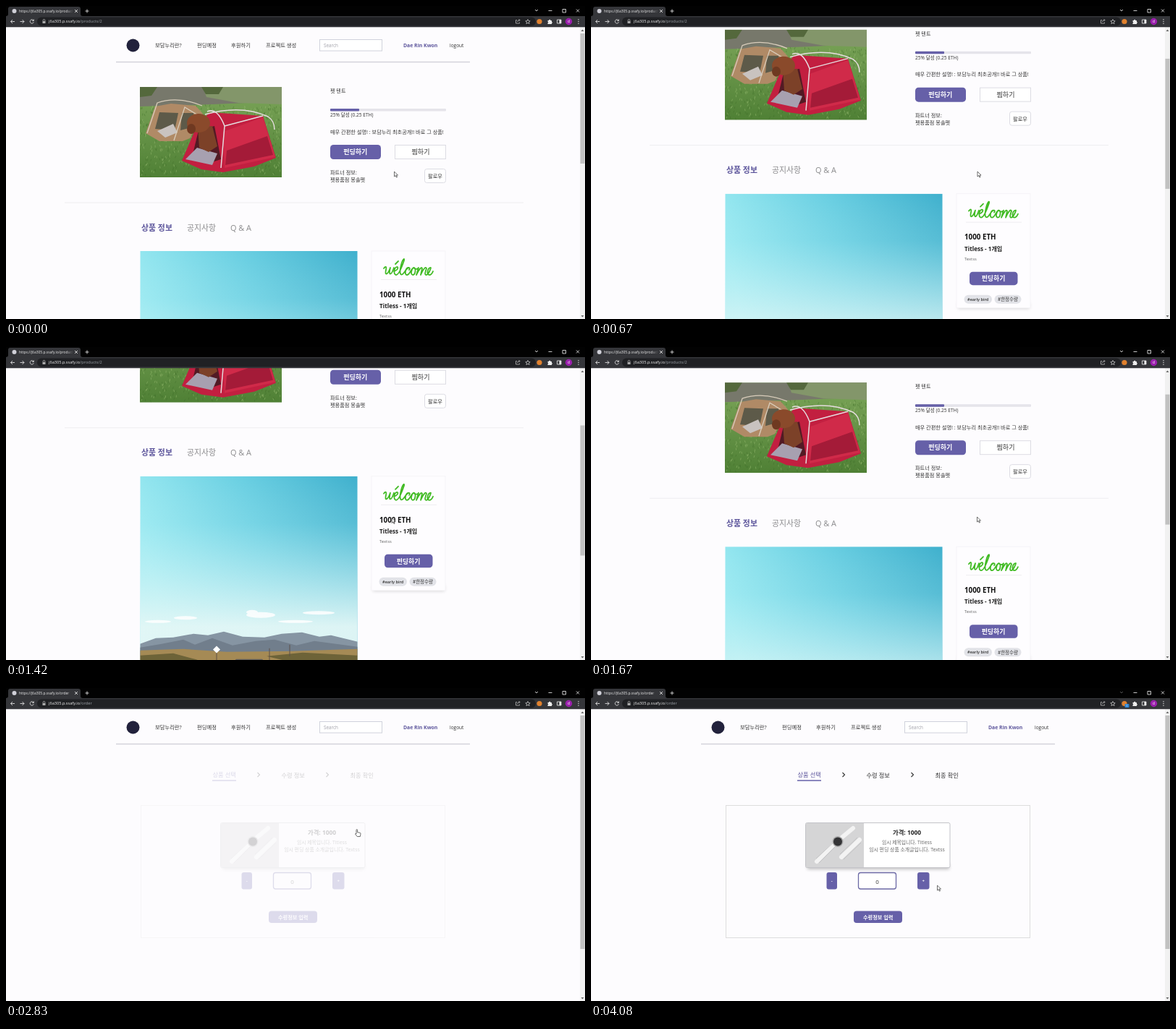
An HTML page for the animation above (4160 ms loop, 800 by 433 pixels).

```html
<!DOCTYPE html>
<html lang="ko">
<head>
<meta charset="utf-8">
<title>Pet tent funding</title>
<style>
html, body { margin: 0; width: 100%; height: 100%; overflow: hidden; background: #fdfcfe; }
svg { display: block; width: 100%; height: 100%; }
text { font: 7.2px 'Open Sans', 'Noto Sans CJK KR', 'Noto Sans CJK', sans-serif; fill: #333; dominant-baseline: central; }
.mid { text-anchor: middle; }
.bold { font-weight: 700; }
.nav { font-size: 7.3px; }
.step { font-size: 8.2px; }
.tab { font-size: 10.9px; fill: #8b8b8d; }
.accent { fill: #5d569c; }
.fill { fill: #6660a8; }
.white { fill: #fff; }
.grey { fill: #666; }
.box { fill: #fff; stroke: #dcdce3; }
.line { fill: none; stroke: #ddd; stroke-width: 1; }
</style>
</head>
<body>
<svg viewBox="0 0 800 433" preserveAspectRatio="none">
  <defs>
    <linearGradient id="sky" x1="0" y1=".25" x2="1" y2="0">
      <stop stop-color="#98e9f1"/><stop offset=".5" stop-color="#69cfe2"/><stop offset="1" stop-color="#3fb0cd"/>
    </linearGradient>
    <linearGradient id="haze" x1="0" y1="0" x2="0" y2="1">
      <stop stop-color="#e4f7f6" stop-opacity="0"/><stop offset=".25" stop-color="#c5f3f6" stop-opacity=".15"/>
      <stop offset=".8" stop-color="#e4f7f6" stop-opacity=".95"/>
    </linearGradient>
    <linearGradient id="grass" x1="0" y1="0" x2="0" y2="1">
      <stop stop-color="#7da65a"/><stop offset="1" stop-color="#4f8035"/>
    </linearGradient>
    <linearGradient id="fade"><stop stop-color="#35363a" stop-opacity="0"/><stop offset="1" stop-color="#35363a"/></linearGradient>
    <filter id="soft" x="-10%" y="-50%" width="120%" height="200%"><feGaussianBlur stdDeviation="2"/></filter>
    <clipPath id="photoClip"><path d="M185 112h196v125H185z"/></clipPath>
    <clipPath id="skyClip"><path d="M185.5 339h300v300h-300z"/></clipPath>
  </defs>

  <rect width="800" height="433" fill="#fdfcfe"/>

  <g id="page">
    <g id="navbar">
      <circle cx="175.5" cy="54.5" r="9" fill="#22223c"/>
      <text class="nav" x="206" y="54">보담누리란?</text>
      <text class="nav" x="264" y="54">펀딩예정</text>
      <text class="nav" x="311" y="54">후원하기</text>
      <text class="nav" x="359" y="54">프로젝트 생성</text>
      <rect class="box" x="433.5" y="46.5" width="86" height="15.5" style="stroke:#d0d2dc"/>
      <text x="439" y="54.3" style="font-size:6.3px;fill:#a0a0a8">Search</text>
      <text class="accent bold" x="549" y="54" style="font-size:6.9px">Dae Rin Kwon</text>
      <text x="613" y="54" style="font-size:6.5px">logout</text>
      <path class="line" d="M152 77.5H641" style="stroke:#d3d3da;stroke-width:1.5"/>
    </g>

    <g id="product">
      <g clip-path="url(#photoClip)">
        <rect x="185" y="112" width="196" height="125" fill="url(#grass)"/>
        <path d="M185 112h196v20l-96 4-100 3z" fill="#77786b"/>
        <path d="M272 112h109v24l-60-2-44-8z" fill="#83966a"/>
        <path d="M185 112h24l-8 12-16 2zM270 112h30l-6 10-18 0z" fill="#54683c"/>
        <path id="blades" fill="none" stroke-width=".7" stroke="#3c6a28" opacity=".6"/>
        <path id="lightBlades" fill="none" stroke-width=".7" stroke="#a3c57c" opacity=".6"/>
        <path d="M193 176l13-37 22-4 34 3 10 11-18 34-10 4-32 0z" fill="#b08a66"/>
        <path d="M206 170l6-23 26 1-5 24zM243 148l16 0 4 18-22 6z" fill="#5d5a49"/>
        <path d="M209 173l22-10 6 12-17 7z" fill="#c9c3c0"/>
        <path d="M195 176l14-42q28-10 62 4M232 186l15-46 20 12" fill="none" stroke="#d9cdbb" stroke-width="1.3"/>
        <path d="M243 214l18-42 20-25 74 5 18 58-30 12-43 8-30-4z" fill="#c21f40"/>
        <path d="M300 174l55-20 17 55-70 15z" fill="#d02a49"/>
        <path d="M305 200l56-20 8 26-66 14z" fill="#a41b38"/>
        <path d="M258 205l8-33 22-6 9 46-18 6z" fill="#521a24"/>
        <path d="M248 212l16-16 28 8-7 16z" fill="#a7a0b0"/>
        <path d="M265 168l20-2 7 28-12 8-13-6z" fill="#7c4128"/>
        <ellipse cx="266" cy="162" rx="16" ry="13" fill="#8a4a2b"/>
        <ellipse cx="256" cy="170" rx="6" ry="7" fill="#6f3921"/>
        <path d="M278 146q14-6 24 20l-5 58M275 150q50-14 87 3 9 6 9 18M302 166l53-14" fill="none" stroke="#e5dcde" stroke-width="1.5"/>
      </g>

      <text x="448" y="117" style="font-size:7.1px">펫 텐트</text>
      <rect x="448" y="142" width="160" height="3.5" rx="1" fill="#e5e4ea"/>
      <rect class="fill" x="448" y="142" width="40" height="3.5" rx="1"/>
      <text x="448" y="150.5" style="font-size:6.6px">25% 달성 (0.25 ETH)</text>
      <text x="448" y="173.5">매우 간편한 설명! : 보담누리 최초공개!! 바로 그 상품!</text>
      <g id="fund">
        <rect class="fill" x="448" y="192" width="70" height="20" rx="4.5"/>
        <text class="mid bold white" x="482.7" y="201.7" style="font-size:9px">펀딩하기</text>
      </g>
      <rect class="box" x="537.5" y="192.5" width="70" height="19"/>
      <text class="mid" x="573" y="201.7" style="font-size:9px;font-weight:500">찜하기</text>
      <text x="448" y="230">파트너 정보:</text>
      <text x="448" y="240">펫용품점 몽솔펫</text>
      <rect class="box" x="578.5" y="225.5" width="29" height="19" rx="3"/>
      <text class="mid" x="593" y="235">팔로우</text>
      <path class="line" d="M81 272H715" style="stroke:#eeedf0"/>

      <text class="tab accent bold" x="187" y="306">상품 정보</text>
      <text class="tab" x="250" y="306">공지사항</text>
      <text class="tab" x="310" y="306">Q &amp; A</text>

      <g clip-path="url(#skyClip)">
        <rect x="185" y="339" width="301" height="300" fill="url(#sky)"/>
        <rect x="185" y="339" width="301" height="260" fill="url(#haze)"/>
        <g fill="#fff" opacity=".85">
          <ellipse cx="352" cy="531" rx="20" ry="4"/><ellipse cx="340" cy="527" rx="8" ry="3"/>
          <ellipse cx="248" cy="535" rx="16" ry="2.5"/><ellipse cx="432" cy="528" rx="22" ry="2.5"/>
          <ellipse cx="210" cy="540" rx="18" ry="2"/><ellipse cx="400" cy="540" rx="24" ry="2"/>
        </g>
        <path d="M185 571l22-8 24-1 28-5 20 2 22-5 26 7 30 1 24-5 28-2 24 6 16-2 37 9v20H185z" fill="#8695a3"/>
        <path d="M185 576l30-5 30-6 16 7 24-9 28 10 32-6 26-2 30 8 25-6 60 8v12H185z" fill="#717e8c"/>
        <path d="M185 580l60-2 60 4 90-1 91-3v61H185z" fill="#a58a55"/>
        <path d="M185 587l46-3 34 9-80 6zM360 588l50-5 76 4v10l-80 2z" fill="#6d6338"/>
        <path d="M318 592h36l50 47H262z" fill="#5e5d5c"/>
        <path d="M291 579v16M364 577v18M392 572v16" stroke="#5c5148"/>
        <path d="M291 573.7l5 5-5 5-5-5z" fill="#fff"/>
      </g>

      <rect x="507" y="490" width="99" height="8" fill="#aaa" opacity=".5" filter="url(#soft)"/>
      <rect x="505" y="339" width="102" height="158" fill="#fefdff" stroke="#f5f4f7"/>
      <path fill="none" stroke="#42bb25" stroke-width="1.8" stroke-linecap="round" stroke-linejoin="round" d="M522 363C525 359 526 361 525 365C523 373 527 373 531 362C528 373 532 374 536 362M536 367C541 366 543 361 540 361C536 362 535 372 539 372C543 372 548 358 550 352C551 348 548 350 546 358C543 370 545 373 548 371C551 369 553 362 557 362C559 363 557 365 557 365M556 362C552 362 550 372 554 372C558 372 559 364 563 362C567 361 566 372 562 372C558 371 561 363 563 362C566 365 569 364 570 362L567 372C571 364 574 360 575 363L573 372C577 363 580 360 581 363C579 369 578 372 581 372C584 371 587 363 587 362C583 361 580 372 585 372C588 372 589 369 590 367M538 357L542 353"/>
      <path class="line" d="M518 378.5H595" style="stroke:#eeedf0"/>
      <text class="bold" x="516" y="399.3" style="font-size:9.8px;fill:#111">1000 ETH</text>
      <text class="bold" x="516" y="414.7" style="font-size:8.1px;fill:#222">Titless - 1개입</text>
      <text class="grey" x="516" y="429" style="font-size:5.9px">Textss</text>
      <rect class="fill" x="523" y="447" width="66.5" height="18.5" rx="4.5"/>
      <text class="mid bold white" x="556" y="456.3" style="font-size:8.9px">펀딩하기</text>
      <g fill="#e2e3e8"><rect x="515.5" y="479" width="38.5" height="12" rx="6"/><rect x="557.5" y="479" width="37" height="12" rx="6"/></g>
      <text class="mid" x="534.7" y="485" style="font-size:5.6px;font-weight:600">#early bird</text>
      <text class="mid" x="576" y="485" style="font-size:6.5px;font-weight:500">#한정수량</text>
    </g>
  </g>

  <g id="order">
    <text class="step accent" x="285.5" y="119.5">상품 선택</text>
    <path class="line" d="M285 128H318" style="stroke:#6660a8;stroke-width:1.3"/>
    <text class="step" x="380.5" y="120">수령 정보</text>
    <text class="step" x="475.5" y="120">최종 확인</text>
    <path class="line" d="M347.5 117l3 3-3 3M442.500 117l3 3-3 3" style="stroke:#333;stroke-width:1.1"/>
    <rect x="186.500" y="162.500" width="420" height="183" class="line"/>
    <rect x="299" y="243" width="196" height="8" fill="#888" opacity=".5" filter="url(#soft)"/>
    <rect x="296.500" y="186.500" width="199.500" height="62" rx="2" class="box" style="stroke:#c3c3c8"/>
    <rect x="297" y="187" width="80" height="61" fill="#d5d5d6"/>
    <g stroke="#f3f3f3" stroke-width="6" stroke-linecap="round"><path d="M312 240L336 216M345 208L362 194M346 234L371 210"/></g>
    <g stroke="#b9b9bb" stroke-width=".7"><path d="M311 236l26-24M315 242l22-22M344 230l24-23M349 237l24-23"/></g>
    <circle cx="341" cy="212.500" r="7.500" fill="#aaa"/><circle cx="341" cy="212.500" r="6" fill="#343436"/>
    <text class="mid bold" x="436.500" y="199" style="font-size:8.4px;fill:#222">가격: 1000</text>
    <text class="mid grey" x="436.500" y="213" style="font-size:6.800px">임시 제목입니다. Titless</text>
    <text class="mid grey" x="436.500" y="223.500" style="font-size:6.900px">임시 펀딩 상품 소개글입니다. Textss</text>
    <g class="fill">
      <rect x="325.500" y="255" width="14.500" height="23.500" rx="3"/>
      <rect x="451" y="255" width="16.500" height="23.500" rx="3"/>
      <rect x="363" y="308.500" width="67" height="16.500" rx="4"/>
    </g>
    <rect class="box" x="369.500" y="255.500" width="52" height="22.500" rx="3" style="stroke:#6c69a5;stroke-width:1.300"/>
    <text class="mid" x="395.500" y="267" style="font-size:8px">0</text>
    <text class="mid white bold" x="332.700" y="266.500" style="font-size:6px">-</text>
    <text class="mid white bold" x="459.200" y="266.500" style="font-size:6px">+</text>
    <text class="mid white bold" x="396.700" y="316.700">수령정보 입력</text>
  </g>

  <rect x="793" y="29" width="7" height="404" fill="#f1f1f1"/>
  <rect id="thumb" x="793.500" width="6" fill="#c1c1c1"/>
  <path d="M794.500 35l2-2.500 2 2.500zM794.500 428l2 2.500 2-2.500z" fill="#666"/>

  <g id="browser">
    <rect width="800" height="14" fill="#020202"/>
    <path d="M0 14q3 0 3-3V4q0-3 3-3h94q3 0 3 3v7q0 3 3 3h694v15.300H0z" fill="#35363a"/>
    <rect x="43" y="15.500" width="689" height="12" rx="6" fill="#202124"/>
    <circle cx="11.500" cy="7" r="3" fill="#d0d0d8"/>
    <text id="title" x="18" y="7" style="font-size:4.950px;fill:#eee"></text>
    <rect x="84" y="2" width="9" height="10" fill="url(#fade)"/>
    <text x="59" y="21.300" style="font-size:5.630px;fill:#f1f1f1">j6a305.p.ssafy.io<tspan id="path" fill="#9aa0a6"></tspan></text>
    <g fill="none" stroke="#ddd" stroke-width=".9">
      <path d="M95 5l4 4m0-4l-4 4M109.500 7h5M112 4.500v5M749.500 6.500h5M769 4.500h4.500v4.500H769zM788 4.500l4 4m0-4l-4 4"/>
      <path id="chevron" d="M731 5l2 2 2-2"/>
      <path d="M12 21.500H6.500m2.500-2.500l-2.500 2.500 2.500 2.500M19.500 21.500H25m-2.500-2.500l2.500 2.500-2.500 2.500M38 20a2.600 2.600 0 1 0 .3 2.200M38.300 18.500v2h-2"/>
      <path d="M51.200 21v-1.300a1.300 1.300 0 0 1 2.600 0V21M706 19.500h-1.500v4.500h5v-1.500M706.500 22q0-2.500 3.500-2.500m-1.500-1.500l1.500 1.500-1.500 1.500" stroke="#aaa"/>
      <path d="M721 18.500l1 2.200 2.200.1-1.700 1.500.6 2.200-2.100-1.200-2.100 1.200.6-2.200-1.700-1.500 2.200-.1z" stroke-width=".7"/>
      <path d="M761.500 19h5.500v5h-5.500z"/>
    </g>
    <path d="M50.500 21h4v3h-4z" fill="#aaa"/>
    <path d="M748.500 20h1.500a1.200 1.200 0 0 1 2.400 0h1.600v1.700a1.200 1.200 0 0 1 0 2.300v1h-5.500v-1.600a1.200 1.200 0 0 0 0-2z M764.500 19h2.500v5h-2.500z" fill="#eee"/>
    <circle cx="737" cy="21.500" r="3.600" fill="#e2822e"/>
    <g id="badge"><rect x="737.500" y="22" width="6" height="5" rx="1" fill="#2f86d6"/><text class="mid white" x="740.500" y="24.500" style="font-size:4px">1</text></g>
    <circle cx="777.500" cy="21.500" r="4.700" fill="#9b1fad"/>
    <text class="mid white" x="777.500" y="21.300" style="font-size:5px">d</text>
    <g fill="#ddd"><circle cx="791" cy="18.800" r=".7"/><circle cx="791" cy="21.500" r=".7"/><circle cx="791" cy="24.200" r=".7"/></g>
  </g>

  <g id="pointer" stroke-width=".7" stroke-linejoin="round" fill="#fff" stroke="#333">
    <path id="arrow" d="M0 0v7l1.700-1.500 1.200 2.600 1.100-.5-1.200-2.500H5z"/>
    <path id="hand" d="M-1 4.500V.6q0-1 .8-1t.8 1v3l3.600.7q1 .3.800 1.500l-.7 3.700h-4L-2.500 6q.2-1.300 1.500-.2z"/>
  </g>
</svg>
<script>
const LOOP = 4160, STEP = 1000 / 12;
const CLICK = 2580, HAND_ON = 1990, HAND_OFF = 3080, BLUR = 3400;
const SCROLL = [[250, 0], [670, 80], [1000, 166.7], [1400, 166.7], [1670, 61.5], [1920, 0]];
const FADE = [[2650, 0], [2830, .2], [3650, 1]];
const MOUSE_X = [[0, 536.5], [670, 534], [1000, 532.5], [1670, 533.5], [1800, 533], [2060, 486.5], [2830, 485], [3080, 485], [3900, 478.5]];
const MOUSE_Y = [[0, 229], [670, 229], [1000, 239], [1670, 235], [1800, 234], [2060, 198], [2830, 196], [3080, 196], [3900, 273]];

const $ = id => document.getElementById(id);
const show = (id, on) => $(id).style.display = on ? '' : 'none';

// Linear interpolation through [time, value] pairs, held at both ends.
function at(keys, t) {
  const next = keys.findIndex(k => k[0] > t);
  if (next < 0) return keys[keys.length - 1][1];
  if (next === 0) return keys[0][1];
  const [t0, a] = keys[next - 1], [t1, b] = keys[next];
  return a + (b - a) * (t - t0) / (t1 - t0);
}

let seed = 7;
const random = () => (seed = seed * 16807 % 2147483647) / 2147483647;
function grass(count) {
  let d = '';
  while (count--) d += `M${185 + random() * 196} ${139 + random() * 98}l${random() * 3 - 1.5} -3`;
  return d;
}
$('blades').setAttribute('d', grass(420));
$('lightBlades').setAttribute('d', grass(320));

function draw(now) {
  const t = Math.floor((now % LOOP + 4) / STEP) * STEP;
  const ordering = t >= CLICK;
  const scroll = at(SCROLL, t);
  const hand = t >= HAND_ON && t < HAND_OFF;
  const path = ordering ? '/order' : '/products/2';

  $('page').setAttribute('transform', `translate(0 ${-scroll})`);
  show('product', !ordering);
  $('order').setAttribute('opacity', at(FADE, t));
  $('fund').setAttribute('transform', hand ? 'translate(483 202) scale(1.03) translate(-483 -202)' : '');
  $('thumb').setAttribute('y', 38 + scroll * .44);
  $('thumb').setAttribute('height', ordering ? 323 : 180);

  $('path').textContent = path;
  $('title').textContent = 'https://j6a305.p.ssafy.io' + (ordering ? path : '/product');
  show('badge', t >= BLUR);
  $('chevron').setAttribute('opacity', t >= BLUR ? .4 : 1);

  $('pointer').setAttribute('transform', `translate(${at(MOUSE_X, t)} ${at(MOUSE_Y, t)})`);
  show('arrow', !hand);
  show('hand', hand);
  requestAnimationFrame(() => draw(performance.now() - start));
}
const start = performance.now();
draw(0);
</script>
</body>
</html>
```
